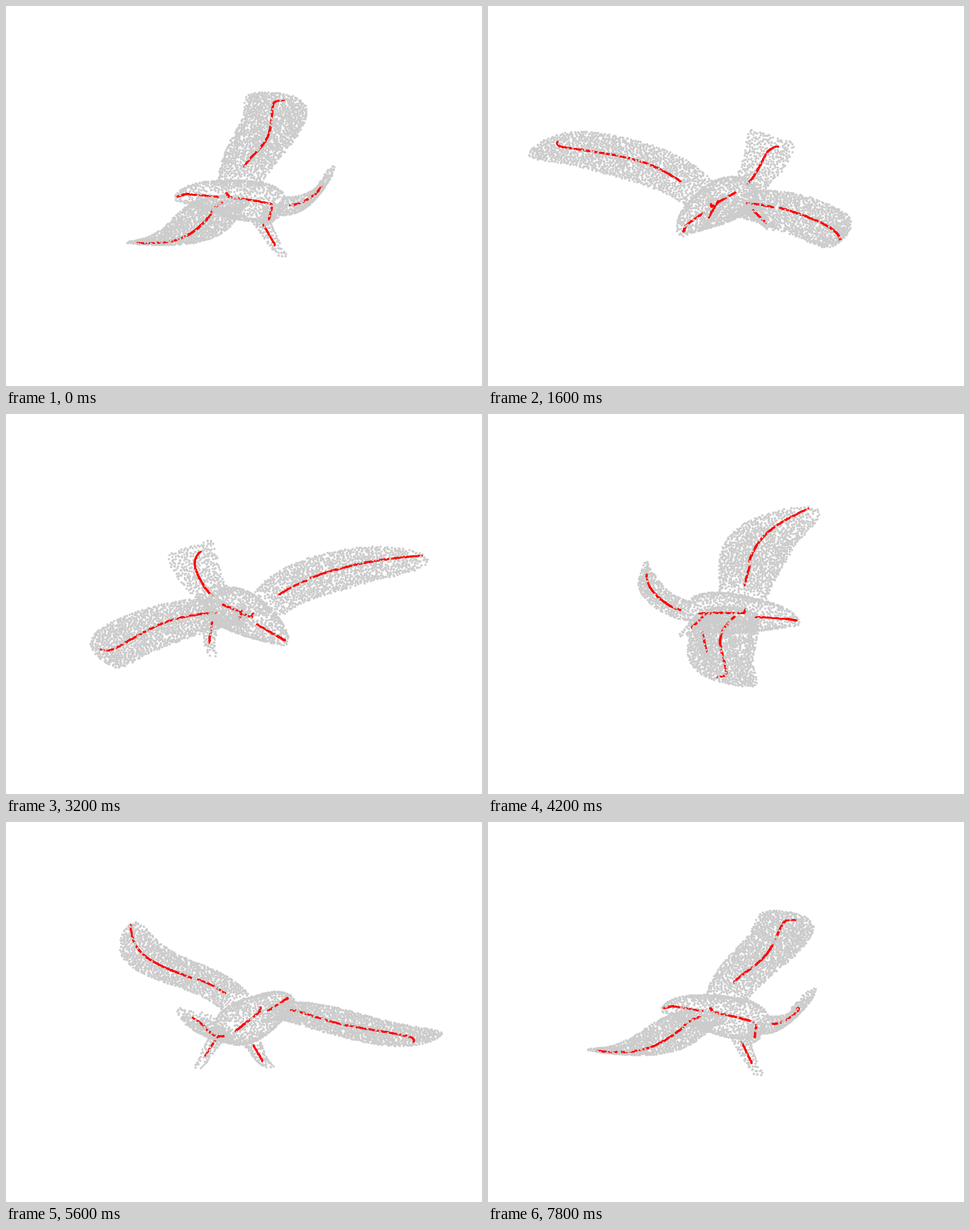
Animation of 837 by 669 pixels, one loop 8 s. Source, as a matplotlib script:

```python
import numpy as np
import matplotlib.pyplot as plt
from matplotlib.animation import FuncAnimation

W, H, DPI = 837, 669, 64
FRAMES, STEP_MS = 40, 200
CENTER_X = 419
TILT = 0.44          # sine of the camera elevation
SPACING = 4.2        # least distance between surface points
GRAY, RED = "#cccccc", "#ff0000"
rng = np.random.default_rng(7)

# Space is (sideways, depth, height), in pixels, with height growing downwards.
# Each part has an axis along t = 0..1 and a shell of ellipses around it.


def xyz(u, v, h):
    return np.stack(np.broadcast_arrays(u, v, h), axis=-1)


def root(x):
    return np.sqrt(np.maximum(x, 0))


class Wing:
    def __init__(self, start, span, height, sweep, rise, blunt):
        self.start, self.span, self.height = start, span, height
        self.sweep, self.rise, self.blunt = sweep, rise, blunt

    def axis(self, t):
        return xyz(self.start + self.span * t,
                   -23 + self.sweep * t**5,
                   self.height + 22 * np.exp(-8 * t) + self.rise * t**6)

    def shell(self, t, a):
        tip = root(1 - t**self.blunt)
        chord = (41 + 17 * np.sin(np.pi * np.minimum(t, 0.5))) * tip
        thick = (5 + 8 * np.exp(-8 * t)) * tip
        return self.axis(t) + xyz(0, chord * np.cos(a),
                                  thick * np.sin(a) - 0.1 * chord * np.cos(a))

    def bone(self, t, wave=0, hook=0, shift=0):
        bend = wave * np.cos(2 * np.pi * (t - 0.4) / 0.75) + hook * (t / 0.93)**40
        return self.axis(t) + xyz(0, bend + shift, 0)


class Tail:
    def axis(self, t):
        q = t * np.pi / 2
        return xyz(-9, 60 + 88 * np.sin(q),
                   283 + 64 * np.maximum(np.cos(q), 0)**1.4)

    def shell(self, t, a):
        wide = (32 + 22 * np.sin(t * np.pi / 2)**2) * root(1 - 0.4 * t**8)
        return self.axis(t) + xyz(wide * np.cos(a), 4 * t * np.sin(a),
                                  (9 - 7 * t) * np.sin(a))

    def bone(self, t):
        j = (t - t[0]) / np.ptp(t)
        return self.axis(t) + xyz(-4 + 22 * j**8, 0, 0)


class Body:
    def shell(self, t, a):
        wide = (60 - 30 * np.exp(-6 * t)) * root(1 - t)
        return xyz(-9 + 4 * t**8 + wide * np.cos(a), 62 - 193 * t,
                   346 + 11 * t**10 + 0.62 * wide * np.sin(a))


class Leg:
    def __init__(self, *joints):
        self.joints = np.array(joints, float)

    def axis(self, t):
        return polyline(self.joints, t)

    def shell(self, t, a):
        r = 8 + 8 * (1 - t)**2
        return self.axis(t) + xyz(r * np.cos(a), r * np.sin(a), 0)


def polyline(knots, t):
    at = np.linspace(0, 1, len(knots))
    return np.stack([np.interp(t, at, c) for c in np.transpose(knots)], axis=-1)


def scatter_on(shell):
    """Random points on a shell, even by area and never too close."""
    t = rng.uniform(0, 1, 20000)
    a = rng.uniform(0, 2 * np.pi, t.size)
    p, e = shell(t, a), 1e-3
    area = np.linalg.norm(np.cross(shell(t + e, a) - p,
                                   shell(t, a + e) - p), axis=1) / e**2
    count = int(area.mean() * 2 * np.pi / SPACING**2)
    pool = p[rng.choice(t.size, count, replace=False, p=area / area.sum())]
    kept = pool[:1]
    for c in pool[1:]:
        if ((kept - c)**2).sum(axis=1).min() > SPACING**2:
            kept = np.vstack([kept, c])
    return kept


left = Wing(start=-42, span=-320, height=311, sweep=-50, rise=3, blunt=20)
right = Wing(start=36, span=283, height=313, sweep=-80, rise=-17, blunt=8)
tail, body = Tail(), Body()
left_leg = Leg((-42, 38, 362), (-58, 26, 396), (-62, 10, 411))
right_leg = Leg((24, 38, 362), (36, 68, 396), (38, 82, 411))
spine = [(-14, 46, 348), (-12, 9, 345), (-9, -32, 344), (-8, -36, 337)]
head = [(-12, -53, 348), (-9, -110, 349), (-3, -125, 353)]


def span(lo, hi, n=120):
    return np.linspace(lo, hi, n)


core = np.vstack([
    left.bone(span(0.12, 0.93, 220), wave=6, hook=22),
    right.bone(span(0.08, 0.29, 50)),
    right.bone(span(0.33, 0.99, 180), shift=4),
    tail.bone(span(0.15, 0.8)),
    polyline(spine, span(0, 1)),
    polyline(head, span(0, 1, 70)),
    left_leg.axis(span(0.08, 0.5, 40)),
    right_leg.axis(span(0.08, 0.5, 40)),
])
core += rng.uniform(-0.5, 0.5, core.shape)
skin = np.vstack([scatter_on(part.shell) for part in
                  (left, right, body, tail, left_leg, right_leg)])
veil = skin[::4]     # surface points that cover the bones


def project(p, angle):
    u, v, h = p.T
    c, s = np.cos(angle), np.sin(angle)
    return CENTER_X + u * c - v * s, h - TILT * (u * s + v * c)


fig = plt.figure(figsize=(W / DPI, H / DPI), dpi=DPI, facecolor="white")
ax = fig.add_axes([0, 0, 1, 1])
ax.set(xlim=(0, W), ylim=(H, 0))
ax.axis("off")


def dots(color, px):
    return ax.plot([], [], "o", color=color, ms=px * 72 / DPI, mew=0)[0]


layers = [(dots(GRAY, 4), skin), (dots(RED, 3.5), core), (dots(GRAY, 4), veil)]


def update(i):
    angle = 2 * np.pi * (i - 12) / FRAMES
    for line, points in layers:
        line.set_data(*project(points, angle))
    return [line for line, _ in layers]


anim = FuncAnimation(fig, update, frames=FRAMES, interval=STEP_MS,
                     repeat=True, repeat_delay=0)
plt.show()
```
